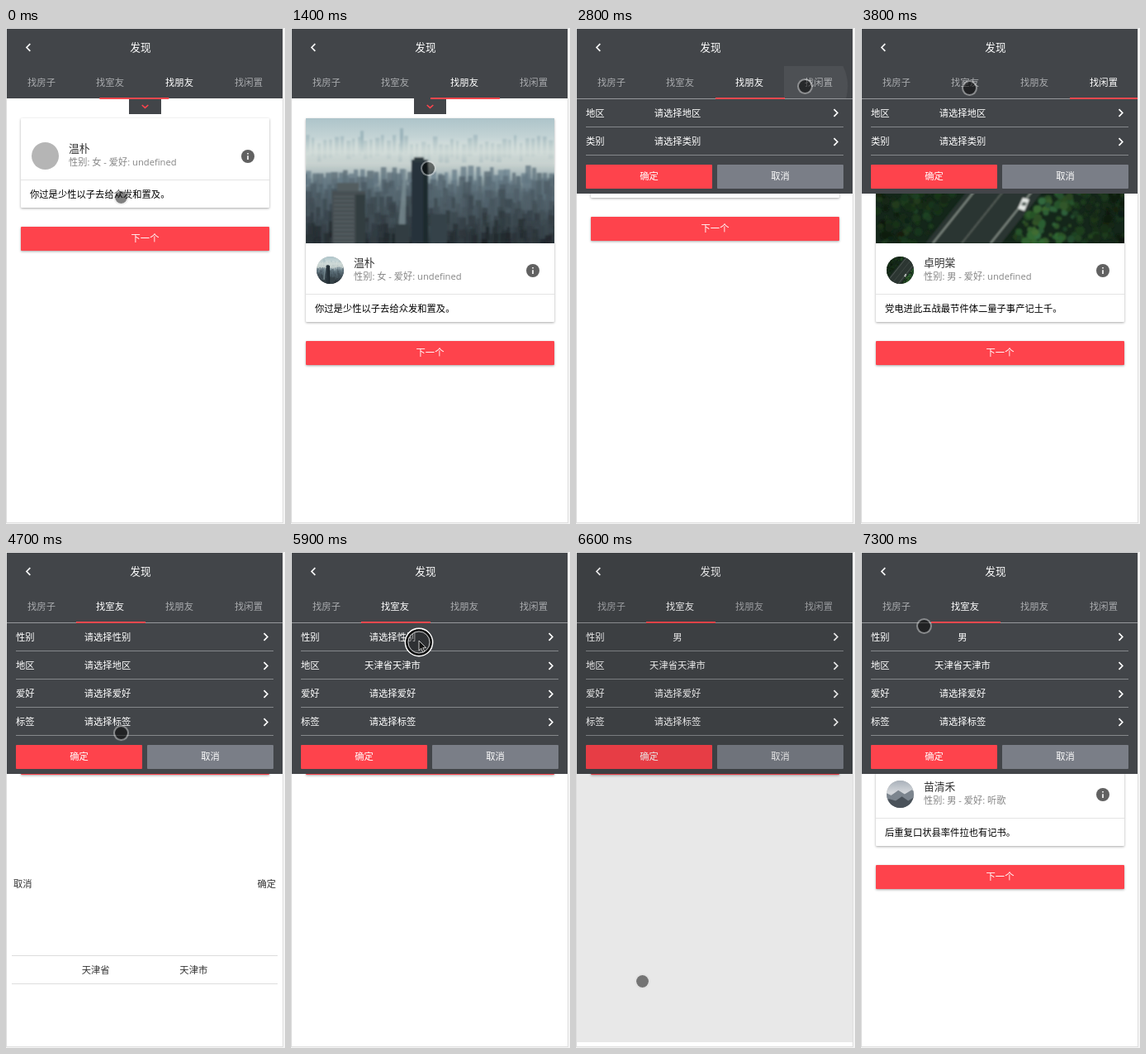
Recreate the animation shown at these times as an HTML page. Size 338 px wide and 599 px high, loop 7.4 s.

```html
<!DOCTYPE html>
<html lang="zh-CN">
<head>
<meta charset="utf-8">
<title>发现</title>
<style>
:root { --dark: #424549; --red: #fe434c; --loop: 7400ms; }
* { box-sizing: border-box; }
html, body { margin: 0; width: 100%; height: 100%; overflow: hidden; background: #f4f4f4; }
body { font: 11.3px/34px "Open Sans", "Noto Sans CJK SC", "Noto Sans CJK", sans-serif; white-space: nowrap; }
svg { display: block; }
.defs { position: absolute; width: 0; height: 0; }
.stage { position: absolute; left: 0; top: 0; width: 338px; height: 599px; overflow: hidden; }
.page { position: absolute; left: 0; top: 0; width: 336px; height: 598px; overflow: hidden;
  background: #fff; border: 1px solid #dedede; }
.page > * { margin: -1px 0 0 -1px; }
.step { animation: var(--loop) step-end infinite; }
.move { animation: var(--loop) linear infinite; }

/* header */
.head { position: absolute; left: 1px; top: 1px; width: 334px; height: 84px; background: var(--dark); color: #fff; z-index: 3; }
.title { position: absolute; left: 100px; width: 124px; top: 5px; font-size: 12.7px; text-align: center; }
.back { position: absolute; left: 22px; top: 17px; }
.tab { position: absolute; top: 45px; width: 84px; height: 39px; line-height: 39px; text-align: center; color: #a9abae; overflow: hidden; }
.friend { animation-name: friend; }
.idle { animation-name: idle; }
.mate { animation-name: mate; }
.ink { position: absolute; left: -29px; top: -29px; width: 106px; height: 106px; border-radius: 50%;
  background: rgba(255,255,255,.065); opacity: 0; animation-name: ink; }
.bar { position: absolute; left: -1px; top: 83px; width: 84px; height: 2px; background: #f5484e; animation-name: bar; }
@keyframes friend { 0% { color: #fff; } 38.9%, 100% { color: #a9abae; } }
@keyframes idle { 0% { color: #a9abae; } 38.9% { color: #fff; } 53.8%, 100% { color: #a9abae; } }
@keyframes mate { 0% { color: #a9abae; } 53.8%, 100% { color: #fff; } }
@keyframes ink {
  0%, 37.3% { transform: scale(.2); opacity: 0; }
  37.838% { transform: none; opacity: 1; }
  40.5%, 100% { transform: scale(1.6); opacity: 0; }
}
@keyframes bar {
  0% { transform: translateX(113px); animation-timing-function: ease-out; }
  4.054%, 38.9% { transform: translateX(169px); animation-timing-function: ease; }
  43.243%, 53.8% { transform: translateX(253px); animation-timing-function: ease; }
  58.108%, 100% { transform: translateX(85px); }
}
.toggle { position: absolute; left: 149px; top: 85px; width: 39px; height: 19px; background: var(--dark); z-index: 1; animation-name: toggle; }
.toggle svg { margin: 7px 0 0 15px; }
@keyframes toggle { 0% { visibility: visible; } 24.05%, 100% { visibility: hidden; } }

/* result cards */
.view { position: absolute; left: 18px; top: 109px; width: 301px; --h: 13px; --art: 0; visibility: hidden; }
.card { background: #fff; border-radius: 1px; box-shadow: 0 1px 3px rgba(0,0,0,.35); }
.photo { height: var(--h); overflow: hidden; }
.photo svg, .face svg { opacity: var(--art); }
.who { position: relative; height: 62px; border-bottom: 1px solid #e4e4e4; }
.face { position: absolute; left: 13px; top: 16px; width: 33px; height: 33px; border-radius: 50%; background: #b5b5b5; overflow: hidden; }
.name { position: absolute; left: 58px; top: 15px; line-height: 17px; font-size: 12.8px; color: #333; }
.info { position: absolute; left: 58px; top: 32px; line-height: 16px; font-size: 11.2px; color: #858585; }
.mark { position: absolute; left: 267px; top: 25px; }
.text { height: 33px; padding-left: 11px; color: #000; overflow: hidden; }
.next { margin-top: 23px; height: 29px; line-height: 28px; text-align: center; color: #fff; background: var(--red);
  border-radius: 1px; box-shadow: 0 1px 3px rgba(0,0,0,.35); }
.a { animation-name: viewA; }
.b { animation-name: viewB; }
.c { animation-name: viewC; }
.b .text { animation: textB var(--loop) step-end infinite; }
@keyframes viewA {
  0% { visibility: visible; --h: 13px; --art: 0; }
  18.65% { --h: 151px; --art: 1; }
  37.57% { visibility: hidden; }
  100% { visibility: hidden; --h: 151px; --art: 1; }
}
@keyframes viewB {
  0% { visibility: hidden; --h: 13px; --art: 0; }
  37.57% { visibility: visible; }
  44.33% { --h: 151px; --art: 1; }
  53.8% { visibility: hidden; }
  100% { visibility: hidden; --h: 151px; --art: 1; }
}
@keyframes viewC {
  0% { visibility: hidden; --h: 13px; --art: 0; }
  53.8% { visibility: visible; }
  90.27% { --h: 151px; --art: 1; }
  100% { visibility: visible; --h: 151px; --art: 1; }
}
@keyframes textB { 0% { height: 21px; color: transparent; } 40.27%, 100% { height: 33px; color: #000; } }

/* filter panels */
.panel { position: absolute; left: 1px; top: 85px; width: 334px; padding: 0 11px 6px; background: var(--dark); color: #fff; z-index: 2; visibility: hidden; }
.panel::before { content: ""; position: absolute; left: 0; top: 0; width: 100%; height: 1px; background: #96989b; }
.row { position: relative; width: 312px; height: 34px; line-height: 33px; border-bottom: 1px solid #85888b; }
.row:first-child { height: 35px; padding-top: 1px; }
.row span { position: absolute; left: 61px; width: 100px; text-align: center; }
.row svg { position: absolute; left: 299px; top: 12px; }
.pair { display: flex; gap: 6px; width: 312px; margin-top: 11px; }
.pair div { width: 153px; height: 29px; line-height: 28px; text-align: center; background: var(--red); border-radius: 1px; }
.pair div + div { background: #7a7e87; }
.two { animation-name: two; }
.four { animation-name: four; }
@keyframes two {
  0%, 24.05% { transform: translateY(-116px); visibility: hidden; animation-timing-function: ease-out; }
  27.03% { transform: none; visibility: visible; }
  53.79% { transform: none; visibility: visible; animation-timing-function: step-end; }
  53.8%, 100% { transform: none; visibility: hidden; }
}
@keyframes four { 0% { visibility: hidden; } 53.8%, 100% { visibility: visible; } }
.area.old { animation-name: areaOld; }
.area.new { animation-name: areaNew; }
.sex.old { animation-name: sexOld; }
.sex.new { animation-name: sexNew; }
@keyframes areaOld { 0% { opacity: 1; } 73.4%, 100% { opacity: 0; } }
@keyframes areaNew { 0% { opacity: 0; } 73.4%, 100% { opacity: 1; } }
@keyframes sexOld { 0% { opacity: 1; } 86.9%, 100% { opacity: 0; } }
@keyframes sexNew { 0% { opacity: 0; } 86.9%, 100% { opacity: 1; } }

/* bottom sheets */
.shade { position: absolute; left: 0; top: 0; width: 336px; height: 598px; background: #000; opacity: 0; z-index: 4; animation-name: shade; }
.sheet { position: absolute; left: 1px; width: 334px; background: #fff; color: #333; z-index: 5; }
.city { top: 345px; height: 252px; transform: translateY(254px); animation-name: city; }
.city div { position: absolute; }
.wheel { left: 6px; right: 6px; top: 103px; height: 35px; display: flex; justify-content: space-evenly; border: solid #ddd; border-width: 1px 0; }
.gender { top: 447px; height: 150px; padding: 6px 16px; line-height: 47px; transform: translateY(152px); animation-name: gender; }
.gender div:first-child { color: #858585; }
@keyframes shade {
  0%, 80.405% { opacity: 0; }
  84.459%, 86.486% { opacity: .26; }
  89.189% { opacity: .092; }
  90.4%, 100% { opacity: 0; }
}
@keyframes city {
  0%, 60.811% { transform: translateY(254px); animation-timing-function: ease-out; }
  64.865%, 73.4% { transform: none; animation-timing-function: ease-in-out; }
  77.703%, 100% { transform: translateY(254px); }
}
@keyframes gender {
  0%, 80.405% { transform: translateY(152px); animation-timing-function: ease-out; }
  84.459%, 86.486% { transform: none; }
  89.189% { transform: translateY(145px); }
  90.4%, 100% { transform: translateY(152px); }
}

/* pointer */
.pointer { position: absolute; left: 0; top: 0; z-index: 6; animation: pointer var(--loop) ease-in-out infinite; }
.dot { position: absolute; left: -9.5px; top: -9.5px; width: 19px; height: 19px; border-radius: 50%;
  background: rgba(0,0,0,.5); background-clip: padding-box; border: 2px solid rgba(222,222,222,.45); animation-name: dot; }
.click { position: absolute; left: -20px; top: -20px; opacity: 0; animation-name: click; }
@keyframes dot { 0% { opacity: 1; } 78.2% { opacity: 0; } 80.6%, 100% { opacity: 1; } }
@keyframes click { 0% { opacity: 0; } 78.2% { opacity: 1; } 80.6%, 100% { opacity: 0; } }
@keyframes pointer {
  0% { transform: translate(139px, 204px); }
  6.757%, 18.919% { transform: translate(166px, 169px); }
  22.973%, 25.676% { transform: translate(168px, 95px); }
  29.73% { transform: translate(215px, 82px); }
  33.784%, 46.622% { transform: translate(277px, 70px); }
  51.351% { transform: translate(131px, 72px); }
  52.703%, 56.757% { transform: translate(126px, 70px); }
  60.811%, 62.162% { transform: translate(130px, 137px); }
  66.216% { transform: translate(168px, 480px); }
  68.919% { transform: translate(168px, 440px); }
  71.622%, 73.649% { transform: translate(308px, 364px); }
  78.378%, 80.811% { transform: translate(155px, 109px); }
  85.135%, 89.189% { transform: translate(80px, 518px); }
  90.541% { transform: translate(80px, 390px); }
  95.946% { transform: translate(76px, 92px); }
  98.649%, 100% { transform: translate(76px, 89px); }
}
</style>
</head>
<body>
<svg class="defs">
  <defs>
    <linearGradient id="haze" x2="0" y2="1">
      <stop offset="0" stop-color="#adc4ca"/><stop offset=".25" stop-color="#d3dedc"/><stop offset=".36" stop-color="#dbe2dc"/>
      <stop offset=".46" stop-color="#a3b4b8"/><stop offset=".6" stop-color="#5a6c74"/><stop offset="1" stop-color="#2d383f"/>
    </linearGradient>
    <linearGradient id="fog" x2="0" y2="1">
      <stop offset="0" stop-color="#d8e1dc" stop-opacity="0"/><stop offset=".4" stop-color="#d3ddd9" stop-opacity=".85"/>
      <stop offset="1" stop-color="#8fa2a8" stop-opacity="0"/>
    </linearGradient>
    <linearGradient id="cloud" x2="0" y2="1">
      <stop offset="0" stop-color="#a9b1ba"/><stop offset=".45" stop-color="#d5d8dc"/><stop offset="1" stop-color="#7d858d"/>
    </linearGradient>
    <filter id="soft"><feGaussianBlur stdDeviation=".8"/></filter>
  </defs>
  <symbol id="skyline" viewBox="0 0 301 151" preserveAspectRatio="xMidYMid slice"></symbol>
  <symbol id="forest" viewBox="0 0 301 151" preserveAspectRatio="xMidYMid slice"></symbol>
  <symbol id="peaks" viewBox="0 0 301 151" preserveAspectRatio="xMidYMid slice">
    <path fill="url(#cloud)" d="M0 0h301v151H0z"/>
    <g filter="url(#soft)">
      <path fill="#7c858e" d="M0 100 60 62 100 82 140 54 175 76 215 52 301 105V151H0z"/>
      <path fill="#4a525a" d="M0 130 90 102 125 112 160 88 195 112 230 90 301 125V151H0z"/>
    </g>
  </symbol>
</svg>

<div class="stage">
  <div class="page" id="page">
    <div class="head">
      <svg class="back" width="9" height="11" fill="none" stroke="#fff" stroke-width="1.7"><path d="M6.3 1.2 2 5.5 6.3 9.8"/></svg>
      <div class="title">发现</div>
      <div class="tab" style="left:0">找房子</div>
      <div class="tab step mate" style="left:83px">找室友</div>
      <div class="tab step friend" style="left:167px">找朋友</div>
      <div class="tab step idle" style="left:251px">找闲置<div class="ink move"></div></div>
      <div class="bar move"></div>
    </div>
    <div class="toggle step"><svg width="9" height="6" fill="none" stroke="#fe434c" stroke-width="1.5"><path d="M.7 1 4.5 4.4 8.3 1"/></svg></div>
    <div class="shade move"></div>
    <div class="sheet city move">
      <div style="left:8px">取消</div><div style="right:8px">确定</div>
      <div class="wheel"><span>天津省</span><span>天津市</span></div>
    </div>
    <div class="sheet gender move"><div>请选择性别</div><div>男</div><div>女</div></div>
  </div>
  <div class="pointer">
    <div class="dot step"></div>
    <svg class="click step" width="40" height="40" fill="none">
      <circle cx="20" cy="20" r="16.6" fill="rgba(0,0,0,.3)" stroke="#fff" stroke-width="1.6"/>
      <circle cx="20" cy="20" r="14.7" stroke="#111" stroke-width="2.2"/>
      <circle cx="20" cy="20" r="13" stroke="#c9cacb" stroke-width="1"/>
      <path d="M20 18v12l2.8-2.6 2 4.6 2-.9-2-4.4h3.8z" fill="#111" stroke="#ddd" stroke-width=".9"/>
    </svg>
  </div>
</div>

<script>
const $ = id => document.getElementById(id);
let seed = 11;
const rnd = (lo, hi) => lo + (hi - lo) * ((seed = seed * 16807 % 2147483647) / 2147483647);
const box = (x, y, w, h, fill) =>
  `<rect x="${x.toFixed(1)}" y="${y.toFixed(1)}" width="${w.toFixed(1)}" height="${h.toFixed(1)}" fill="${fill}"/>`;

function skyline() {
  let s = box(0, 0, 301, 151, 'url(#haze)') + '<g filter="url(#soft)">';
  for (let x = 0; x < 301; x += 7) s += box(x, rnd(20, 32), rnd(3, 6), 22, 'rgba(130,160,170,.4)');
  s += box(114, 12, 4, 30, '#9bb4bb') + box(66, 15, 4, 26, '#9fb8be');
  s += box(0, 24, 301, 44, 'url(#fog)');
  // rows of roofs, darker towards the viewer
  for (let i = 0; i < 10; i++) {
    for (let x = rnd(-8, 0); x < 301; x += rnd(5, 11)) {
      const shade = 44 - i * 3 + rnd(-6, 5);
      s += box(x, 62 + i * 9 + rnd(-5, 5), rnd(4, 9), rnd(12, 28), `hsla(202 14% ${shade.toFixed(0)}% / .75)`);
    }
  }
  s += '<path fill="#82959a" opacity=".7" d="M119 62h3l-2 89h-10z"/>';
  s += box(32, 88, 40, 63, '#464f53') + box(38, 78, 26, 10, '#535d60') + box(60, 92, 12, 59, '#333c41');
  for (let y = 94; y < 150; y += 5) s += box(34, y, 24, 1.2, '#5c6567');
  s += box(128, 50, 20, 101, '#27333a') + box(131, 47, 12, 6, '#2d3a41') + box(142, 54, 6, 97, '#1f292f');
  s += box(108, 128, 18, 23, '#333e43') + box(151, 116, 20, 35, '#364248') + '</g>';
  return s;
}

function forest() {
  const tree = () => {
    let x, y, k;
    do { x = rnd(0, 301); y = rnd(0, 151); k = x + .8 * y; } while (k > 174 && k < 277);
    const light = rnd(6, 15) + 17 * Math.exp(-(((x - 205) / 48) ** 2)) + 4 * Math.exp(-(((x - 50) / 40) ** 2));
    return `<circle cx="${x.toFixed(1)}" cy="${y.toFixed(1)}" r="${rnd(2, 5.5).toFixed(1)}" fill="hsl(${rnd(105, 135).toFixed(0)} 36% ${light.toFixed(0)}%)"/>`;
  };
  let s = box(0, 0, 301, 151, '#14261a') + '<g filter="url(#soft)">';
  s += '<path fill="#2c3632" d="M181 0h92L152 151H60z"/>';
  s += '<path fill="none" stroke="#8f9a92" stroke-width="1.6" d="M190 0 69 151M260 0 139 151"/>';
  s += '<path fill="none" stroke="#7c867e" stroke-width="1" d="M225 0 104 151"/>';
  s += '<path fill="#e3e7e4" d="M178 96l8 2-6 14-8-3z"/><path fill="#59655f" d="M178 101l5 1-2 4-5-1z"/>';
  for (let i = 0; i < 600; i++) s += tree();
  return s + '</g>';
}

const art = (id, w, h) => `<svg width="${w}" height="${h}"><use href="#${id}" width="${w}" height="${h}"/></svg>`;
const card = (cls, pic, name, info, text) => `
  <div class="view step ${cls}">
    <div class="card">
      <div class="photo">${art(pic, 301, 151)}</div>
      <div class="who">
        <div class="face">${art(pic, 33, 33)}</div>
        <div class="name">${name}</div><div class="info">${info}</div>
        <svg class="mark" width="16" height="16"><circle cx="8" cy="8" r="8" fill="#616161"/><path fill="#fff" d="M7.2 4h1.6v1.6H7.2zM7.2 7.2h1.6V12H7.2z"/></svg>
      </div>
      <div class="text">${text}</div>
    </div>
    <div class="next">下一个</div>
  </div>`;

const row = (label, value, cls) => `
  <div class="row">${label}${value
    ? `<span class="step old ${cls}">请选择${label}</span><span class="step new ${cls}">${value}</span>`
    : `<span>请选择${label}</span>`}
    <svg width="8" height="11" fill="none" stroke="#fff" stroke-width="1.7"><path d="M1.5 1.2 5.8 5.5 1.5 9.8"/></svg>
  </div>`;
const panel = (cls, rows) => `
  <div class="panel ${cls}">${rows.map(r => row(...r)).join('')}
    <div class="pair"><div>确定</div><div>取消</div></div>
  </div>`;

$('skyline').innerHTML = skyline();
$('forest').innerHTML = forest();
$('page').insertAdjacentHTML('beforeend',
  card('a', 'skyline', '温朴', '性别: 女 - 爱好: undefined', '你过是少性以子去给众发和置及。') +
  card('b', 'forest', '卓明棠', '性别: 男 - 爱好: undefined', '党电进此五战最节件体二量子事产记土千。') +
  card('c', 'peaks', '苗清禾', '性别: 男 - 爱好: 听歌', '后重复口状县率件拉也有记书。') +
  panel('move two', [['地区'], ['类别']]) +
  panel('step four', [['性别', '男', 'sex'], ['地区', '天津省天津市', 'area'], ['爱好'], ['标签']]));
</script>
</body>
</html>
```
